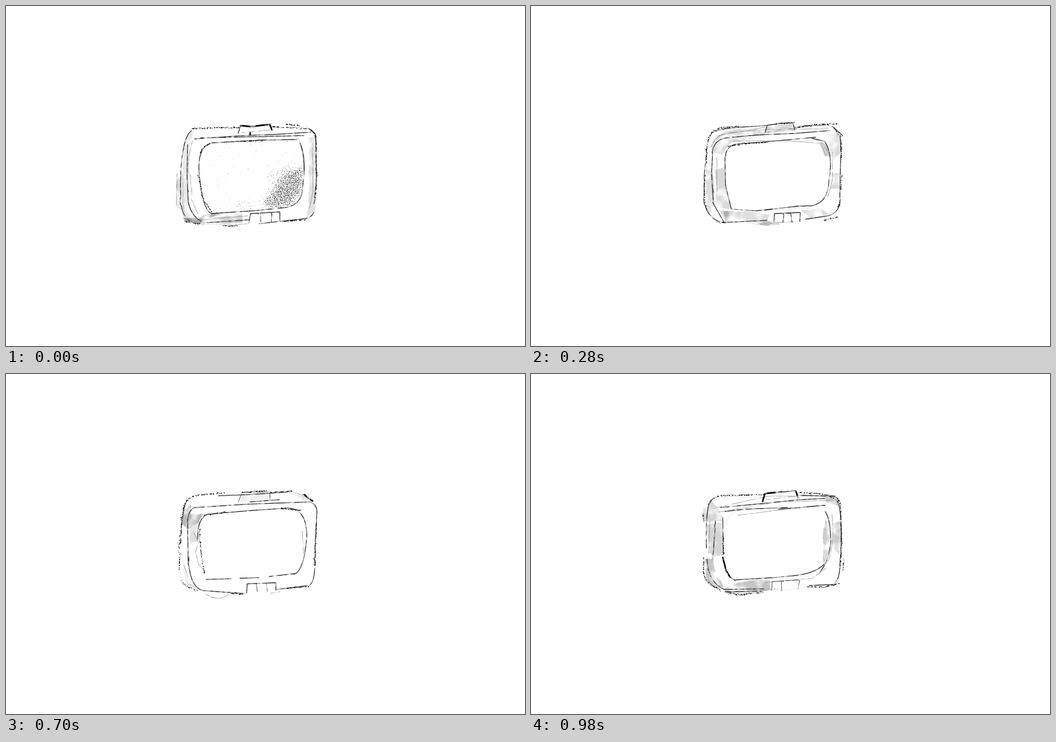
Recreate the animation shown at these times as an HTML page. Size 923 by 606 pixels, loop 1120 ms.

```html
<!DOCTYPE html>
<html lang="en">
<head>
<meta charset="utf-8">
<title>Sketched television</title>
<style>
html, body { margin: 0; width: 100%; height: 100%; overflow: hidden; background: #fff; }
svg { display: block; width: 100vw; height: 100vh; }
path { fill: none; stroke: #2c2c2c; stroke-linecap: round; stroke-linejoin: round; }
.wash { filter: url(#wash); }
.wash path { stroke: none; fill: #000; fill-rule: evenodd; }
.pencil { filter: url(#pencil); }
.dry { filter: url(#dry); }
.spray { filter: url(#spray); }
.spray path { stroke: none; fill: #000; }
.thin { stroke: #444; stroke-width: 1; }
.soft { stroke: #666; stroke-width: 1.1; opacity: .6; }
.line { stroke-width: 1.4; }
.bold { stroke: #000; stroke-width: 2.8; }
.dry path { stroke: #111; stroke-width: 1.9; }

/* The five drawings play forwards, then back. */
.pose { opacity: 0; animation: 1120ms step-end infinite; }
#a { animation-name: first; }
#b { animation-name: second; }
#c { animation-name: third; }
#d { animation-name: fourth; }
#e { animation-name: fifth; }
@keyframes first { 0% { opacity: 1 } 12.5%, 100% { opacity: 0 } }
@keyframes second { 0%, 25% { opacity: 0 } 12.5%, 87.5%, 100% { opacity: 1 } }
@keyframes third { 0%, 37.5%, 87.5%, 100% { opacity: 0 } 25%, 75% { opacity: 1 } }
@keyframes fourth { 0%, 50%, 75%, 100% { opacity: 0 } 37.5%, 62.5% { opacity: 1 } }
@keyframes fifth { 0%, 62.5%, 100% { opacity: 0 } 50% { opacity: 1 } }
</style>
</head>
<body>
<svg viewBox="0 0 923 606">
<defs>
  <filter id="pencil" filterUnits="userSpaceOnUse" x="295" y="198" width="270" height="212" color-interpolation-filters="sRGB">
    <feTurbulence type="fractalNoise" baseFrequency=".05" numOctaves="1" seed="3" result="bend"/>
    <feDisplacementMap in="SourceGraphic" in2="bend" scale="2" xChannelSelector="R" yChannelSelector="G" result="bent"/>
    <feGaussianBlur in="bent" stdDeviation=".3" result="line"/>
    <feTurbulence type="fractalNoise" baseFrequency=".12" numOctaves="3" seed="8"/>
    <feColorMatrix values="0 0 0 0 0  0 0 0 0 0  0 0 0 0 0  0 0 0 2.6 -.45" result="grain"/>
    <feComposite in="line" in2="grain" operator="in"/>
  </filter>
  <filter id="dry" filterUnits="userSpaceOnUse" x="295" y="198" width="270" height="212" color-interpolation-filters="sRGB">
    <feTurbulence type="fractalNoise" baseFrequency=".15" numOctaves="2" seed="5" result="bend"/>
    <feDisplacementMap in="SourceGraphic" in2="bend" scale="3" xChannelSelector="R" yChannelSelector="G" result="line"/>
    <feTurbulence type="fractalNoise" baseFrequency=".4" numOctaves="2" seed="11"/>
    <feColorMatrix values="0 0 0 0 0  0 0 0 0 0  0 0 0 0 0  0 0 0 7 -3" result="grain"/>
    <feComposite in="line" in2="grain" operator="in"/>
  </filter>
  <filter id="wash" filterUnits="userSpaceOnUse" x="295" y="198" width="270" height="212" color-interpolation-filters="sRGB">
    <feTurbulence type="fractalNoise" baseFrequency=".04" numOctaves="3" seed="7" result="cloud"/>
    <feDisplacementMap in="SourceGraphic" in2="cloud" scale="7" xChannelSelector="R" yChannelSelector="G" result="edge"/>
    <feColorMatrix in="cloud" values="0 0 0 0 0  0 0 0 0 0  0 0 0 0 0  0 0 0 3 -.7" result="tone"/>
    <feComposite in="edge" in2="tone" operator="in"/>
    <feGaussianBlur stdDeviation=".7"/>
  </filter>
  <filter id="spray" filterUnits="userSpaceOnUse" x="340" y="238" width="192" height="132" color-interpolation-filters="sRGB">
    <feGaussianBlur in="SourceGraphic" stdDeviation="6" result="density"/>
    <feTurbulence type="fractalNoise" baseFrequency=".7" numOctaves="2" seed="4" result="noise"/>
    <feComposite in="noise" in2="density" operator="arithmetic" k2="1" k3=".3" k4="-.25"/>
    <feColorMatrix values="0 0 0 0 .25  0 0 0 0 .25  0 0 0 0 .25  0 0 0 6 -3.1"/>
  </filter>
  <clipPath id="glass"><path d="M344 288Q344 250 366 244L518 240Q529 248 528 325Q525 354 500 359L365 367Q349 355 344 288"/></clipPath>
  <path id="ring" d="M314 246Q318 220 345 219L532 216Q552 218 552 240L550 350Q549 376 530 379L400 387L342 387Q314 380 311 345L311 290ZM344 288Q344 250 366 245L518 240Q530 250 530 300Q529 353 500 359L365 368Q349 362 344 288Z"/>
</defs>

<g id="a" class="pose">
  <g class="wash">
    <use href="#ring" opacity=".05"/>
    <path opacity=".09" d="M318 236L332 222L325 260L326 350L340 384L318 384L311 340Z"/>
    <path opacity=".33" d="M316 376L342 380L356 370L376 367L380 372L352 379L346 389L320 386Z"/>
    <path opacity=".17" d="M345 379L420 372L422 386L350 391ZM303 300L309 300L311 360L303 356Z"/>
    <path opacity=".12" d="M537 236L550 232L552 330L548 370L534 376L540 330Z"/>
  </g>
  <g clip-path="url(#glass)"><g class="spray">
    <path d="M448 358L472 326L500 294L532 282L528 334L500 362Z"/>
    <path opacity=".45" d="M404 348L440 344L440 366L404 366ZM462 304L500 276L506 290L476 322Z"/>
  </g></g>
  <g class="pencil">
    <path class="soft" d="M304 300L303 357L311 361M322 232Q311 262 310 300M314 300L315 360L324 382M332 240Q322 270 325 300M351 386L420 385M386 391L432 388M328 300L330 345L342 372M519 235Q533 258 531 300M545 245L546 330L540 360M418 226L470 221M352 381L430 374"/>
    <path class="line" d="M330 222Q318 232 315 260Q309 285 311 350Q313 373 326 383M323 247L322 300L324 350Q330 374 346 383M335 237L420 231L476 229L542 225M346 235L440 233L530 231M343 290Q342 250 366 244L452 239L518 238M522 243Q531 262 530 300L527 330Q524 353 500 359L440 365L365 370Q348 361 343 290M358 386L432 381M450 388L487 384L532 379Q545 376 547 368M417 213L413 227M540 220Q551 225 551 240L552 310L548 352"/>
    <path class="line" d="M432 386L435 370L487 367L487 383M453 369L453 385M473 368L472 384"/>
    <path class="bold" d="M417 213L435 215L469 211L473 221M434 226L434 229"/>
  </g>
  <g class="dry">
    <path d="M330 219L372 217L414 217M472 215L540 219M498 211L522 213M540 220Q551 226 552 242L551 292M553 292L552 322L549 346M318 384L345 388M532 381L494 384M345 262Q350 250 362 246M342 300L350 342L366 368M418 241L456 240M386 392L412 392"/>
  </g>
</g>

<g id="b" class="pose">
  <g class="wash">
    <use href="#ring" opacity=".09"/>
    <path opacity=".17" d="M304 240L320 226L341 250L340 262L306 263Z"/>
    <path opacity=".17" d="M313 268L340 264L343 324L326 326L316 318Z"/>
    <path opacity=".23" d="M308 330L324 328L330 360L342 380L330 385L311 368ZM358 372L424 366L428 386L352 394L344 382Z"/>
    <path opacity=".2" d="M524 258Q533 276 532 310L520 342Q516 304 524 258ZM515 217L548 222L549 238L526 230ZM535 264L552 262L554 300L548 320L536 310Z"/>
  </g>
  <g class="pencil">
    <path class="soft" d="M322 240L420 218L540 217M334 246L440 228L540 225M368 252L420 245L520 234M329 270L323 330M535 250Q541 290 530 330L515 350M345 389L420 386M318 262L316 320M418 224L470 218M400 373L500 364L525 346"/>
    <path class="line" d="M318 227Q310 248 312 310M337 238L400 232L478 224L522 222M345 245L380 241L456 238M440 241L523 234M328 262L324 322M341 255L342 322M362 367L430 363L472 359Q510 354 525 335M523 245Q533 258 533 300Q530 334 514 353M544 226Q552 234 552 300L549 346Q548 366 540 372M313 330Q315 372 344 384L414 383M345 388L410 387M495 377L542 375M477 216L540 218"/>
    <path class="thin" d="M428 386L429 370L478 367L475 383M445 369L446 387M433 383L434 384M438 383L439 384"/>
    <path class="bold" d="M412 227L416 213L446 210M471 209L475 220M341 327L347 350L354 362"/>
    <path class="line" d="M440 211L471 208L477 222M354 362L363 368"/>
  </g>
  <g class="dry">
    <path d="M316 232Q322 220 336 217L376 216L414 215M307 328L307 358Q312 374 338 386M306 250L307 262M471 211L510 213L540 218Q550 224 551 240L552 320L549 346M556 330L555 350M492 379L520 380L548 373M342 290L342 322M350 389L370 394L412 389M530 217L548 229"/>
  </g>
</g>

<g id="c" class="pose">
  <g class="wash">
    <use href="#ring" opacity=".15"/>
    <path opacity=".15" d="M320 240L344 223L400 218L418 231L354 245L340 264L322 262ZM328 292L344 286L347 330L354 362L330 360Z"/>
    <path opacity=".13" d="M310 290L324 296L326 350L318 372L311 350ZM334 366L360 364L424 372L420 385L348 385Z"/>
    <path opacity=".15" d="M417 213L468 209L468 222L417 228ZM482 365L514 358L528 372L500 381ZM528 232L549 228L551 262L534 274ZM532 298L552 298L549 326L532 326Z"/>
    <path opacity=".22" d="M514 242L528 248L531 268L522 266ZM402 386L440 384L440 390L408 392ZM340 366L358 364L360 376L346 380Z"/>
  </g>
  <g class="pencil">
    <path class="soft" d="M320 252Q328 230 350 226L420 220L530 219M328 232L416 216M360 241L440 239L520 245M322 300L326 350M331 270L330 330M536 260L536 310L528 340M514 246L525 266M518 244L529 262M400 390L442 386L468 385M420 225L466 218"/>
    <path class="line" d="M322 262Q325 238 348 235L400 230L470 227L532 222M346 268Q346 249 368 246L430 241L506 234M323 262L321 300L324 346M345 270L346 320L356 361M357 362L400 365L474 357L500 356Q529 350 530 310Q538 264 522 241L500 236M414 364L480 356M313 252L308 302L308 344Q310 374 334 384M323 350L343 385M549 230Q552 240 550 300L549 356M342 386L420 382M488 380L522 375Q546 372 549 352M538 216L554 232M478 214L530 212M420 213L416 226M328 223Q340 218 372 216L420 213"/>
    <path class="line" d="M432 385L433 370L479 368L478 384M450 369L448 385M462 369L464 385"/>
    <path class="line" d="M417 213L445 209L466 208L469 221"/>
  </g>
  <g class="dry">
    <path d="M314 246Q316 222 340 217L372 214M312 250L312 280M309 302L308 344L313 364M330 385L346 386M436 210L468 208M470 217L510 211L546 210M536 215L547 229M552 240L552 270M553 302L551 328M550 346L546 358M518 383L546 376M350 250L380 245L420 243"/>
  </g>
</g>

<g id="d" class="pose">
  <g class="wash">
    <use href="#ring" opacity=".018"/>
    <path opacity=".28" d="M314 244L328 233L328 248L351 249L343 264L326 276L313 266Z"/>
    <path opacity=".12" d="M326 276L344 262L343 298L328 304Z"/>
    <path opacity=".07" d="M311 340L322 360L342 384L324 381ZM512 213L540 216L546 226L528 225ZM420 212L469 211L469 223L417 228Z"/>
  </g>
  <g class="pencil">
    <path class="soft" d="M333 280L342 300L337 318L343 340L352 350M316 340L323 360L322 374L340 380M355 392Q366 400 380 400Q391 398 396 392M527 280L529 320M306 300L307 318L314 322M470 391L488 388M512 212Q528 213 530 222"/>
    <path class="line" d="M324 340L323 260Q326 240 336 238L430 232L540 228Q553 232 553 246L550 300L550 343M324 326Q326 380 350 386L420 391M341 294Q340 258 358 250L440 243L500 239Q535 239 535 290Q530 352 512 357M356 366L400 365M416 364L450 363M468 361L512 356M319 230Q311 262 311 300M378 217L430 215L508 210M482 384L538 377Q548 374 549 345M434 228L486 224"/>
    <path class="thin" d="M413 228L420 211L467 210M469 211L470 225M445 374L447 388M463 374L465 388"/>
    <path class="line" d="M428 390L429 374L480 372L480 386"/>
    <path class="bold" d="M531 215L537 222L545 226"/>
  </g>
  <g class="dry">
    <path d="M314 246Q318 222 336 217L360 214L388 212M312 250L312 274L308 310M309 320L308 350M312 368Q320 382 340 386M344 276L347 320L353 356M351 252L390 246M490 240L524 243M420 211L465 208M470 211L508 209M528 214L546 227M552 260L551 292M550 300L548 344M500 382L538 379M400 391L424 392"/>
  </g>
</g>

<g id="e" class="pose">
  <g class="wash">
    <use href="#ring" opacity=".06"/>
    <path opacity=".17" d="M312 262L326 240L346 244L342 276L326 300L312 300Z"/>
    <path opacity=".14" d="M326 356L350 364L390 368L388 386L344 386L326 376ZM532 240L550 232L552 284L536 288Z"/>
    <path opacity=".12" d="M418 213L469 210L470 223L416 228ZM490 362L526 346L540 370L498 380Z"/>
  </g>
  <g class="pencil">
    <path class="soft" d="M320 250Q326 230 350 226L420 221L520 217M334 262L330 320L340 354M312 320L318 366L334 380M536 256L538 310L528 342M380 390L430 389M420 224L468 219"/>
    <path class="line" d="M324 330L322 270Q325 242 340 237L430 231L542 226Q552 232 553 250L550 344M324 326Q327 374 347 385L422 388M343 290Q342 252 364 247L440 242L506 237Q533 241 533 290Q530 350 508 357L440 363L360 367Q346 348 343 290M318 232Q311 258 311 300L310 346M482 383L530 378Q547 374 549 344M378 217L470 213L530 213"/>
    <path class="thin" d="M447 372L448 387M464 371L465 386"/>
    <path class="line" d="M430 388L431 372L481 369L480 385M414 228L419 212L468 209L471 223"/>
  </g>
  <g class="dry">
    <path d="M314 248Q318 222 338 218L386 214M310 300L308 350Q314 380 340 387M352 252L396 246M346 310L354 354M420 211L466 208M472 212L512 210M530 214L547 228M553 262L551 300L549 346M498 382L544 376"/>
  </g>
</g>
</svg>
</body>
</html>
```
